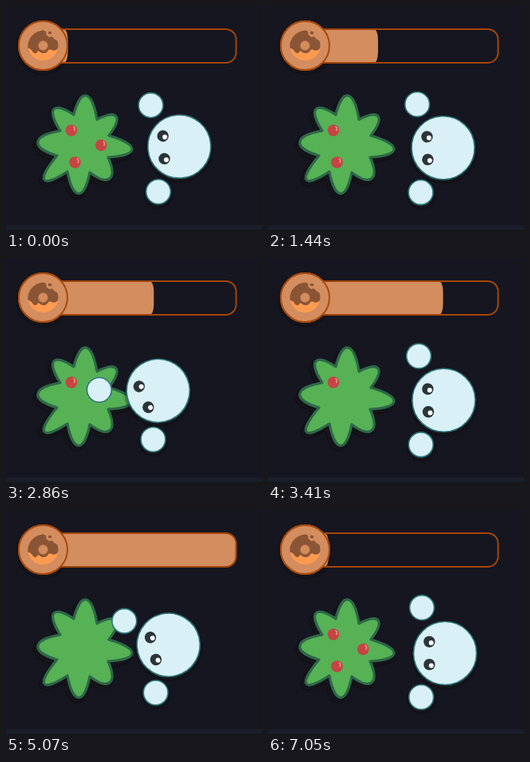
These frames come from a looping animation (321x280 px, 7080 ms). An HTML page:

```html
<!DOCTYPE html>
<html lang="en">
<head>
<meta charset="utf-8">
<title>Berry picking</title>
<style>
  html, body { margin: 0; width: 100%; height: 100%; overflow: hidden; background: #161620; }
  svg { display: block; width: 321px; height: 280px; }
  .skin { fill: #d9f0f7; stroke: #2f7479; stroke-width: 1.6; }
</style>
</head>
<body>
<svg viewBox="0 0 321 280">
  <defs>
    <filter id="shade" x="-20%" y="-20%" width="140%" height="140%">
      <feDropShadow dx="0" dy="3" stdDeviation="2" flood-color="#08080d" flood-opacity=".75"/>
    </filter>
    <filter id="bushShade" x="-20%" y="-20%" width="140%" height="140%">
      <feDropShadow dx="-3" dy="4" stdDeviation="2" flood-color="#08080d" flood-opacity=".75"/>
    </filter>
    <clipPath id="barClip"><rect x="33" y="29" width="255.5" height="42" rx="13"/></clipPath>
    <circle id="badge" cx="46.5" cy="49.5" r="30.5" fill="#d38d5f" stroke="#a84a0c" stroke-width="2"/>
    <g id="berry">
      <circle r="7.3" fill="#c64543"/>
      <path d="M3.2-4.5Q5-2.5 3.8 0" fill="none" stroke="#e58a80" stroke-width="1.8" stroke-linecap="round"/>
    </g>
    <g id="eye">
      <circle r="7.2" fill="#2b3538"/>
      <circle cx="2.4" cy="1.4" r="3" fill="#fff"/>
    </g>
  </defs>

  <rect width="321" height="280" fill="#161620"/>
  <rect y="274" width="321" height="6" fill="#1a1e29"/>

  <use href="#badge" filter="url(#shade)"/>
  <g clip-path="url(#barClip)">
    <rect id="fill" x="33" y="29" height="42" rx="5" ry="13" fill="#d38d5f"/>
  </g>
  <rect x="33" y="29" width="255.5" height="42" rx="13" fill="none" stroke="#a04606" stroke-width="2"/>
  <use href="#badge"/>
  <g transform="translate(46.5 49.5)">
    <circle r="18.8" fill="#ff9b50"/>
    <path d="M-19 3C-20-10-10-19 1-19Q5-18 4-14Q8-9 11-12Q14-8 18-6Q20 1 18 4Q14 8 10 5Q7 4 5 8Q1 11-4 8Q-6 5-8 9Q-12 11-14 6Q-17 3-19 3Z" fill="#8a5535"/>
    <path d="M1-20Q5-18 4-14Q8-9 11-12Q14-8 19-6L17-13L9-20Z" fill="#d38d5f"/>
    <path d="M7-18l4 1-1 3-4-1z" fill="#8a5535"/>
    <circle r="6" fill="#d38d5f" stroke="#b06c42"/>
  </g>

  <path id="bush" filter="url(#bushShade)" fill="#56b255" stroke="#2f6848" stroke-width="3.2" stroke-linejoin="round"/>
  <use href="#berry" class="berry" x="119.3" y="174"/>
  <use href="#berry" class="berry" x="86.5" y="195.5"/>
  <use href="#berry" class="berry" x="82" y="155.5"/>

  <circle id="nearHand" class="skin" r="15.4"/>
  <g filter="url(#shade)">
    <circle id="farHand" class="skin" r="15.4"/>
    <g id="body">
      <circle class="skin" r="39.5"/>
      <use href="#eye" x="-19.7" y="-14.5"/>
      <use href="#eye" x="-19.7" y="14"/>
    </g>
  </g>
</svg>
<script>
  const LOOP = 7080;
  const REACH = 80;
  // Each grab: time of full reach, time to get there, time to come back.
  const grabs = [
    { peak: 829, out: 1100, back: 742 },
    { peak: 2760, out: 1250, back: 760 },
    { peak: 4729, out: 1047, back: 742 }
  ];
  const REGROW = 6000;
  // Bar edge moves: start, end, distance.
  const barMoves = [[700, 1690, 71], [2400, 3300, 71], [4190, 5060, 70], [5900, 6600, -213.5]];

  const $ = id => document.getElementById(id);
  const berries = document.querySelectorAll('.berry');
  const clamp = v => Math.min(1, Math.max(0, v));
  const ease = v => (1 - Math.cos(Math.PI * clamp(v))) / 2;

  function bushPath() {
    const tips = [[100.5, 112], [138, 138], [158, 179], [130, 215.5], [91, 234.5], [48, 217], [40, 170], [60, 129]];
    const dips = [[85, 136], [114, 142], [129, 162], [128, 189], [105, 208], [77, 207], [64, 187], [68, 156]];
    const n = tips.length, pinch = 0.5;
    let d = `M${dips[0]}`;
    tips.forEach((tip, i) => {
      const a = dips[i], b = dips[(i + 1) % n];
      const ctrl = (p, q) => p.map((v, k) => {
        const mid = (v + q[k]) / 2;
        return v + (tip[k] - mid) * 4 / 3 - (v - mid) * pinch;
      });
      d += `C${ctrl(a, b)} ${ctrl(b, a)} ${b}`;
    });
    return d + 'Z';
  }

  function reachAt(t) {
    const each = grabs.map(g => ease(1 - (t < g.peak ? (g.peak - t) / g.out : (t - g.peak) / g.back)));
    return 0.5 + (REACH - 0.5) * Math.max(...each);
  }

  function place(id, x, y, turn = 0) {
    $(id).setAttribute('transform', `translate(${x} ${y}) rotate(${turn})`);
  }

  function draw(t) {
    const d = reachAt(t);
    place('nearHand', 193.5 - d, 122 + 0.1 * d + 0.006 * d * d);
    place('farHand', 192.2 - 0.1 * d, 234 - 0.17 * d + 0.001 * d * d);
    place('body', 222.2 - 0.41 * d, 179.2 - 0.32 * d + 0.0019 * d * d, -0.31 * d);

    const edge = barMoves.reduce((x, [from, to, by]) => x + by * ease((t - from) / (to - from)), 77.5);
    $('fill').setAttribute('width', edge - 33);

    berries.forEach((berry, i) => {
      const gone = t >= grabs[i].peak && t < REGROW;
      berry.setAttribute('visibility', gone ? 'hidden' : 'visible');
    });
  }

  $('bush').setAttribute('d', bushPath());
  const start = performance.now();
  function tick() {
    draw((performance.now() - start) % LOOP);
    requestAnimationFrame(tick);
  }
  tick();
</script>
</body>
</html>
```
